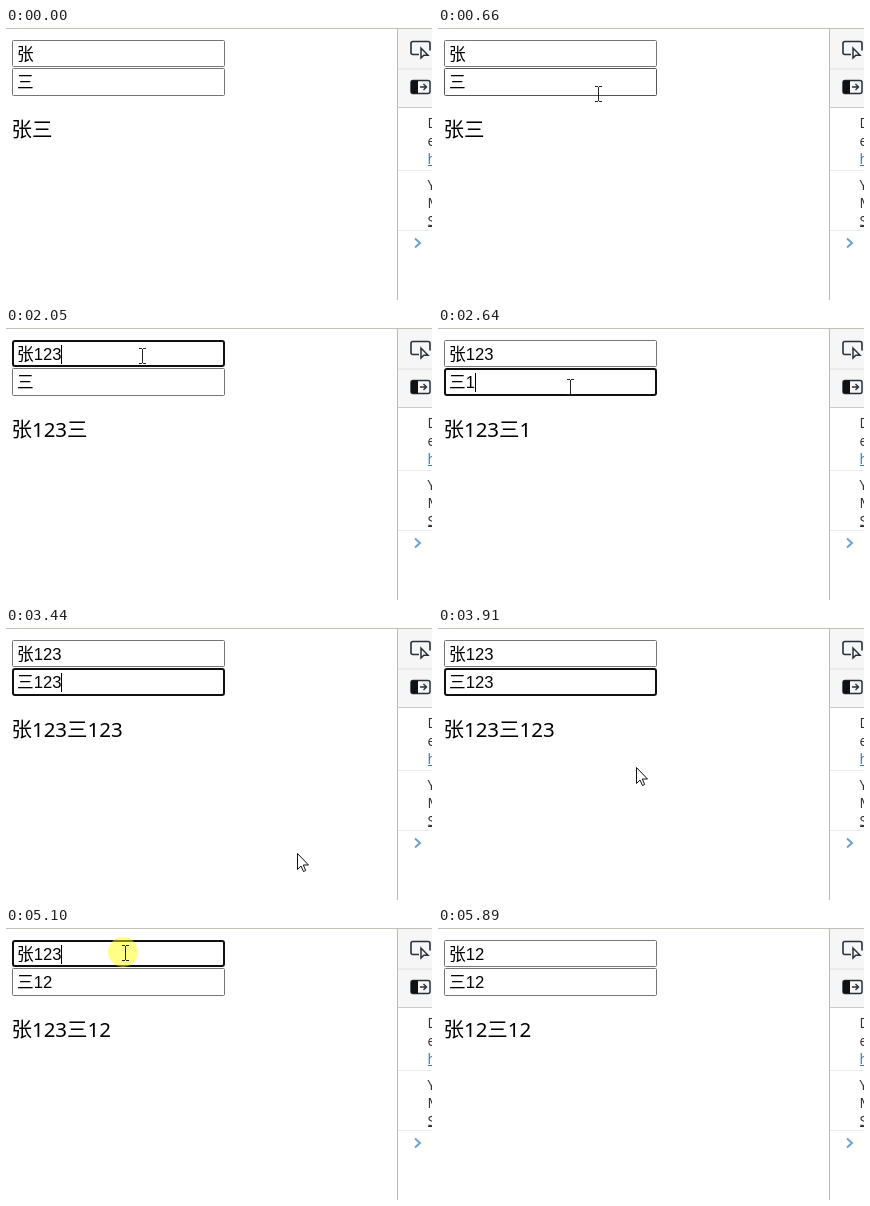
Animation of 426x272 px, one loop 5960 ms. Source, as an HTML page with a canvas:

```html
<!DOCTYPE html>
<html lang="zh-CN">
<head>
<meta charset="utf-8">
<style>
html, body { margin: 0; width: 100%; height: 100%; overflow: hidden; background: #fff; }
canvas { display: block; }
</style>
</head>
<body>
<canvas width="426" height="272"></canvas>
<script>
const ctx = document.querySelector('canvas').getContext('2d');
const LOOP = 5960, TICKS = 90;   // the screen refreshes 90 times per loop
const BLINK = 9, BLUR = 89;      // in ticks, as are all times below
const CJK = '"Noto Sans CJK SC", "Noto Sans CJK", sans-serif';
const INPUT_FONT = '350 16.67px "Liberation Sans", ' + CJK;
const OUTPUT_FONT = '350 20.5px "Noto Sans", ' + CJK;
const PANEL_FONT = '14px "Open Sans", sans-serif';

// Three digits are typed at an even pace, later the last one is erased
const fields = [
  { y: 12, h: 27, name: '张', start: 22, pace: 3.5, erase: 79 },
  { y: 40, h: 28, name: '三', start: 40, pace: 3, erase: 69 }
];

// The mouse enters, then makes these trips; some end with a click on a field
const enter = { arrive: 2, x: 302, y: 205 };
const trips = [
  { leave: 2, arrive: 12, x: 143, y: 50 },
  { leave: 15, arrive: 17, x: 136, y: 24, field: 0 },
  { leave: 30, arrive: 35, x: 132, y: 59, field: 1 },
  { leave: 46, arrive: 52, x: 291, y: 225 },
  { leave: 52, arrive: 64, x: 142, y: 87 },
  { leave: 69, arrive: 76, x: 119, y: 25, field: 0 },
  { leave: 79, arrive: 85, x: 380, y: 274 }
];
const clicks = trips.filter(t => 'field' in t);
const activity = [
  ...clicks.map(c => c.arrive),
  ...fields.flatMap(f => [0, 1, 2].map(i => Math.ceil(f.start + i * f.pace)).concat(f.erase))
];

const clamp = (v, lo, hi) => Math.min(hi, Math.max(lo, v));

function valueOf(f, tick) {
  const typed = clamp(Math.floor((tick - f.start) / f.pace) + 1, 0, 3);
  return f.name + '123'.slice(0, typed - (tick >= f.erase));
}

function mouseAt(tick) {
  if (tick < enter.arrive || tick >= trips.at(-1).arrive) return null;
  const i = trips.findLastIndex(t => t.leave <= tick);
  const to = trips[i], from = trips[i - 1] || enter;
  const p = clamp((tick - to.leave) / (to.arrive - to.leave), 0, 1);
  const k = p * p * (3 - 2 * p);
  return {
    x: Math.round(from.x + (to.x - from.x) * k),
    y: Math.round(from.y + (to.y - from.y) * k)
  };
}

function rect(x, y, w, h, color) {
  ctx.fillStyle = color;
  ctx.fillRect(x, y, w, h);
}

function text(str, x, y, font, color = '#000') {
  ctx.font = font;
  ctx.fillStyle = color;
  ctx.fillText(str, x, y);
}

function shape(d, x, y, { fill, stroke, width = 1 }) {
  const p = new Path2D(d);
  ctx.save();
  ctx.translate(x, y);
  ctx.lineWidth = width;
  if (fill) { ctx.fillStyle = fill; ctx.fill(p); }
  if (stroke) { ctx.strokeStyle = stroke; ctx.stroke(p); }
  ctx.restore();
}

function drawField(field, value, focused, hovered, caret) {
  const w = focused ? 2 : 1;
  ctx.beginPath();
  ctx.roundRect(6 + w / 2, field.y + w / 2, 213 - w, field.h - w, focused ? 2 : 1);
  ctx.lineWidth = w;
  ctx.strokeStyle = focused ? '#101010' : hovered ? '#555' : '#767676';
  ctx.stroke();
  text(value, 11, field.y + 20, INPUT_FONT);
  if (focused && caret) rect(Math.round(11 + ctx.measureText(value).width), field.y + 5, 1, 19, '#000');
}

function drawPanel() {
  const ink = '#27303b', gray = '#303030', link = '#2b7bc0';
  rect(391, 1, 35, 271, '#fff');
  rect(392, 1, 34, 78, '#f6f6f7');
  rect(392, 40, 34, 2, '#ebebed');
  rect(392, 79, 34, 1, '#cacacc');
  rect(391, 1, 1, 271, '#b9b9b9');

  // Inspect and sidebar buttons
  shape('M9 14H3Q1 14 1 12V3Q1 1 3 1H18Q20 1 20 3V10', 404, 12.5, { stroke: ink, width: 1.6 });
  shape('M11 7.5V17.5L13.8 14.8H18Z', 404, 12.5, { stroke: ink, width: 1.5 });
  shape('M3 1H18Q20 1 20 3V12Q20 14 18 14H3Q1 14 1 12V3Q1 1 3 1Z', 404, 51.5, { stroke: ink, width: 1.5 });
  shape('M2 1H8V14H2L1 12V3Z', 404, 51.5, { fill: '#111' });
  shape('M10 7.5H16.5M13.5 4.5L16.5 7.5L13.5 10.5', 404, 51.5, { stroke: ink, width: 1.4 });

  // Console messages
  [...'DehYMS'].forEach((c, i) =>
    text(c, 421.5, 100 + i * 18 + (i > 2 ? 8 : 0), PANEL_FONT, c === 'h' ? link : gray));
  rect(422, 137, 4, 1, link);
  rect(422, 198, 4, 1, gray);
  rect(392, 142, 34, 1, '#ebebed');
  rect(392, 202, 34, 1, '#ebebed');
  shape('M0 0L5 4.5L0 9', 409, 210.5, { stroke: '#6b9fd0', width: 1.9 });
}

function drawMouse({ x, y }, beam, pressed) {
  if (pressed) {
    ctx.beginPath();
    ctx.arc(x - 2, y - 1, 15, 0, 7);
    ctx.fillStyle = 'rgba(255,255,0,.47)';
    ctx.fill();
  }
  if (beam) {
    shape('M-3 -7.5H0M1 -7.5H4M.5 -7V7M-3 7.5H0M1 7.5H4', x, y, { stroke: '#222' });
  } else {
    shape('M.5 .5V16.5L4 13L6.5 18.5L8.7 17.5L6.3 12H11.5Z', x, y, { fill: '#fff', stroke: '#111' });
  }
}

function draw(now) {
  const tick = Math.floor((now % LOOP + 12) * TICKS / LOOP);
  const click = clicks.findLast(c => c.arrive <= tick);
  const focus = click && tick < BLUR ? click.field : -1;
  const lastAction = Math.max(...activity.filter(t => t <= tick));
  const caret = Math.floor((tick - lastAction) / BLINK) % 2 === 0;
  const values = fields.map(f => valueOf(f, tick));
  const mouse = mouseAt(tick);
  const hover = mouse && mouse.x >= 6 && mouse.x < 219
    ? fields.findIndex(f => mouse.y >= f.y && mouse.y < f.y + f.h) : -1;

  rect(0, 0, 426, 272, '#fff');
  rect(0, 0, 426, 1, '#c2c0b6');
  fields.forEach((f, i) => drawField(f, values[i], i === focus, i === hover, caret));
  text(values.join(''), 5.4, 109, OUTPUT_FONT);
  drawPanel();
  if (mouse) drawMouse(mouse, hover >= 0, click && tick < click.arrive + 2);
  requestAnimationFrame(draw);
}
requestAnimationFrame(draw);
</script>
</body>
</html>
```
